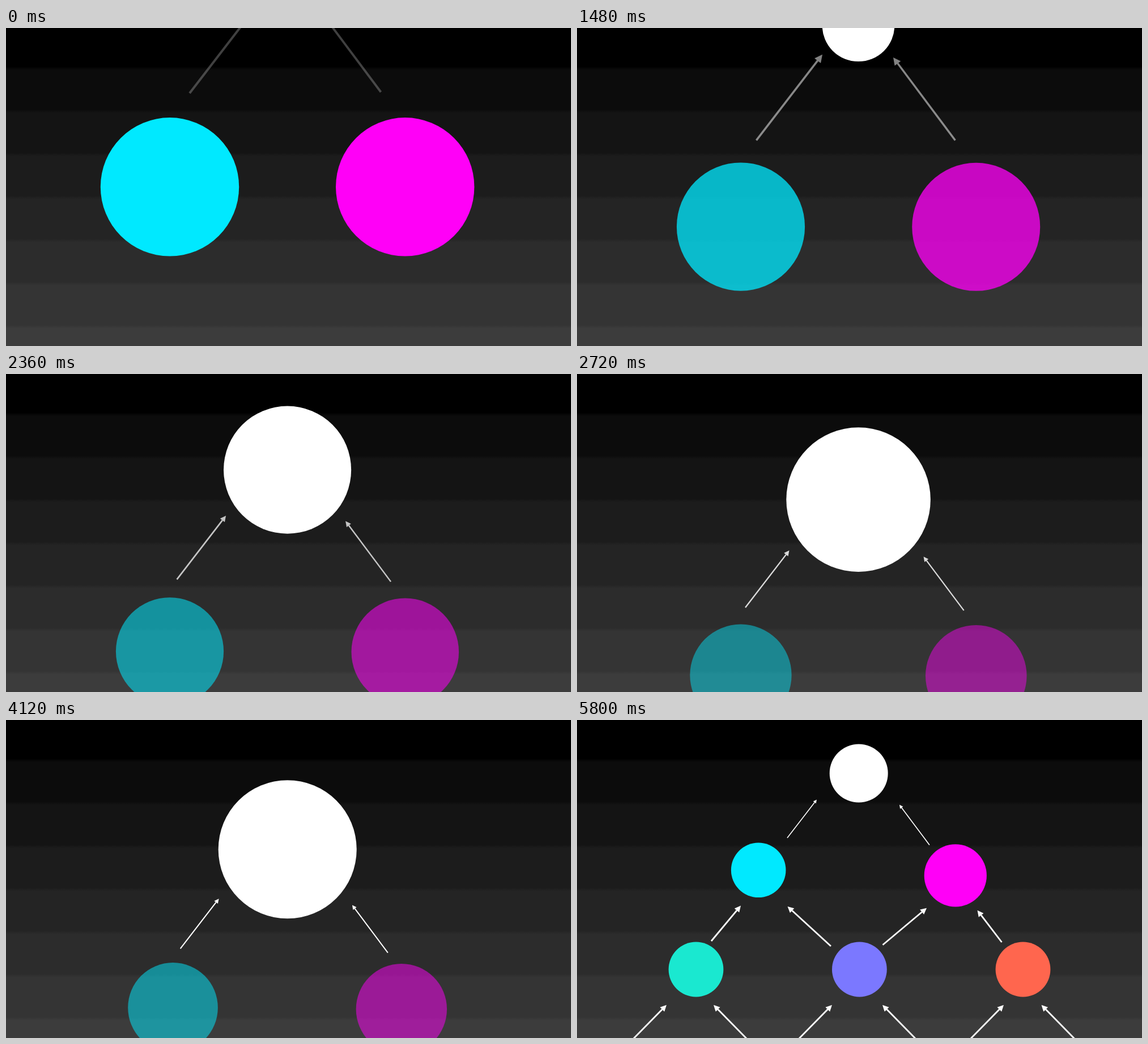
These frames come from a looping animation (997 px wide and 561 px high, 6280 ms). An HTML page with a canvas:

```html
<!DOCTYPE html>
<html lang="en">
<head>
<meta charset="utf-8">
<title>Node tree</title>
<style>
  html, body { margin: 0; width: 100%; height: 100%; overflow: hidden; background: #000; }
  canvas { display: block; width: 997px; height: 561px; }
</style>
</head>
<body>
<canvas id="stage" width="997" height="561"></canvas>
<script>
const W = 997, H = 561, LOOP = 6280, TICK = 40;
const ctx = document.getElementById('stage').getContext('2d');

// Start and end of the two moves, then the two hard cuts, in ms
const MOVES = [[480, 3360], [3840, 4800]];
const ROW_AT = 5320, BASE_AT = 5800;
const ROW_Y = 440, ROW_R = 48.4, TIP_Y = 502.8, STROKE = 2.8;

// Poses are x, y, size; alpha holds one value per pose
const DIM = [1, .3, 1], RISE = [.25, 1, 1], SOLID = [1, 1, 1];
const nodes = [
  { color: '#00e9ff', alpha: DIM, poses: [[289, 280.3, 122.2], [289, 559.6, 86], [320.2, 264.8, 48.3]] },
  { color: '#ff00f7', alpha: DIM, poses: [[704.2, 280.3, 122.2], [704.3, 560.8, 85.6], [667.8, 274.4, 55.1]] },
  { color: '#fff', alpha: SOLID, poses: [[496.5, -92.7, 39.2], [496.6, 257.1, 137.2], [497.2, 94, 51.5]] }
];
// Arrows keep their angle; x, y is the tail and size the length
const links = [
  { deg: 52.4, alpha: RISE, poses: [[324, 115, 216], [294, 445.5, 117], [371, 208, 85.2]] },
  { deg: 126.8, alpha: RISE, poses: [[661.5, 113, 207.5], [685, 451.5, 108.6], [622, 220.5, 88.6]] }
];

// Lower row: each node with the x of the two arrow tips below it
const row = [
  { x: 210, color: '#1ae8d0', tips: [158, 241] },
  { x: 498.4, color: '#7b78ff', tips: [450, 539] },
  { x: 787, color: '#ff664e', tips: [753, 819.5] }
];
// Tail x, tail y, length, angle
const rowLinks = [
  [237, 390, 81.3, 50.2], [448, 399, 103.7, 137.5],
  [539.5, 396.8, 101.2, 40], [749.5, 392, 70.8, 127.4]
];

const mix = (a, b, k) => a + (b - a) * k;
const clamp = v => Math.min(1, Math.max(0, v));

// cubic-bezier(.42, 0, .58, 1), solved by bisection
function ease(p) {
  let lo = 0, hi = 1;
  for (let i = 0; i < 24; i++) {
    const s = (lo + hi) / 2;
    const x = 1.26 * s * (1 - s) ** 2 + 1.74 * s * s * (1 - s) + s ** 3;
    if (x < p) lo = s; else hi = s;
  }
  return lo * lo * (3 - 2 * lo);
}

// Position and size ease, opacity runs linearly
function poseAt({ poses, alpha }, t) {
  const i = t < MOVES[1][0] ? 0 : 1;
  const [from, to] = MOVES[i];
  const p = clamp((t - from) / (to - from)), e = ease(p);
  const pose = poses[i].map((v, n) => mix(v, poses[i + 1][n], e));
  return [...pose, mix(alpha[i], alpha[i + 1], p)];
}

function disc(x, y, r, color, alpha = 1) {
  ctx.globalAlpha = alpha;
  ctx.fillStyle = color;
  ctx.beginPath();
  ctx.arc(x, y, r, 0, Math.PI * 2);
  ctx.fill();
}

function arrow(x, y, len, deg, w = STROKE, alpha = 1) {
  const head = w * 3.9, half = head / 2;
  ctx.save();
  ctx.globalAlpha = alpha;
  ctx.fillStyle = '#fff';
  ctx.translate(x, y);
  ctx.rotate(-deg * Math.PI / 180);
  ctx.fillRect(0, -w / 2, len - head, w);
  ctx.beginPath();
  ctx.moveTo(len, 0);
  ctx.lineTo(len - head, half);
  ctx.lineTo(len - head, -half);
  ctx.fill();
  ctx.restore();
}

// Grey bands, 76 px apart, with slightly soft borders
const backdrop = ctx.createLinearGradient(0, 0, 0, H);
for (let i = 0; i < 8; i++) {
  const g = i && 4 + 8 * i, top = 76 * i - 5;
  for (const y of [top + 3, top + 73]) {
    backdrop.addColorStop(clamp(y / H), `rgb(${g},${g},${g})`);
  }
}

function drawRow() {
  for (const { x, color } of row) disc(x, ROW_Y, ROW_R, color);
  for (const link of rowLinks) arrow(...link);
}

// Arrows rising from below the stage on both sides of each node
function drawBase() {
  const reach = 80;
  for (const { tips } of row) {
    tips.forEach((x, i) => {
      const side = i ? 1 : -1;
      arrow(x + side * reach * .983, TIP_Y + reach, reach * 1.402, 90 + side * 44.5);
    });
  }
}

function draw(t) {
  ctx.globalAlpha = 1;
  ctx.fillStyle = backdrop;
  ctx.fillRect(0, 0, W, H);
  for (const link of links) {
    const [x, y, len, alpha] = poseAt(link, t);
    arrow(x, y, len, link.deg, len * .0186, alpha);
  }
  for (const node of nodes) {
    const [x, y, r, alpha] = poseAt(node, t);
    disc(x, y, r, node.color, alpha);
  }
  if (t >= ROW_AT) drawRow();
  if (t >= BASE_AT) drawBase();
}

const start = performance.now();
function tick() {
  const t = (performance.now() - start) % LOOP;
  draw(Math.floor(t / TICK) * TICK);
  requestAnimationFrame(tick);
}
tick();
</script>
</body>
</html>
```
